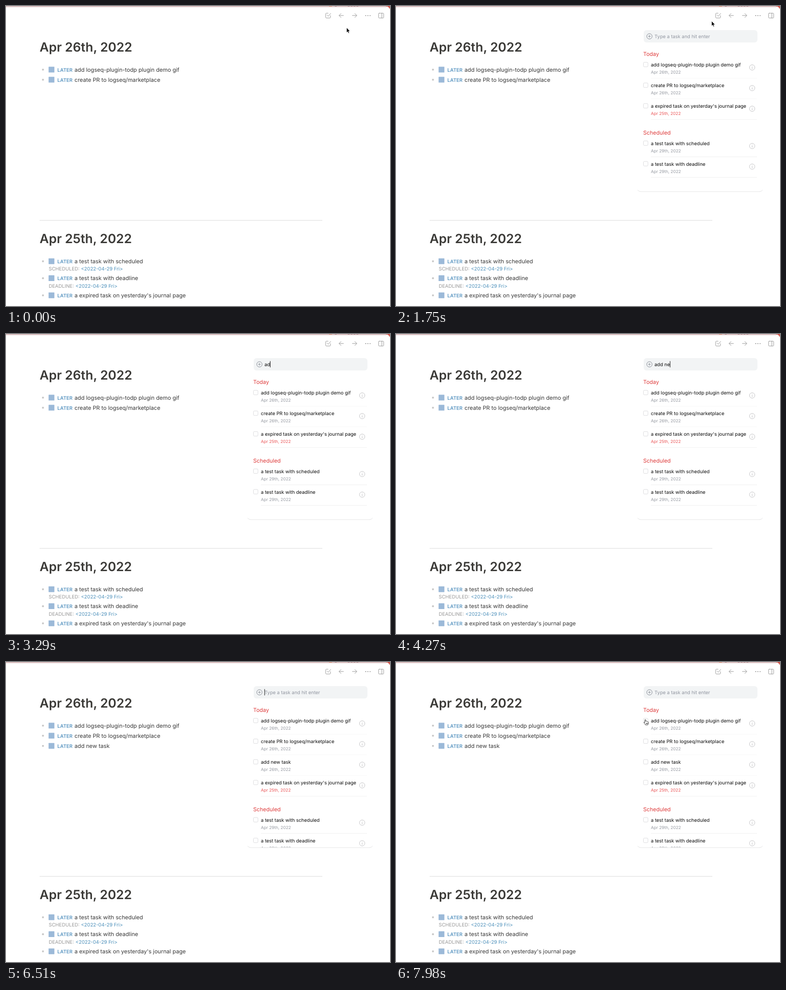
An HTML page for the animation above (8 s loop, 800 by 625 pixels).

```html
<!DOCTYPE html>
<html lang="en">
<head>
<meta charset="utf-8">
<title>Journal tasks</title>
<style>
  html, body { margin: 0; width: 100%; height: 100%; overflow: hidden; background: #fff; }
  svg { display: block; width: 800px; height: 625px; }
  text { font-family: Inter, sans-serif; white-space: pre; text-rendering: geometricPrecision; }
  .title { font-size: 26.4px; font-weight: 600; fill: #3b3a37; }
  .body { font-size: 11.6px; fill: #383838; }
  .later { font-size: 10.1px; font-weight: 600; fill: #5c97c2; }
  .meta { font-size: 10.1px; fill: #999; }
  .link { fill: #4b8fba; }
  .head { font-size: 11.4px; fill: #de3c3c; }
  .item { font-size: 9.95px; fill: #0c0c0c; }
  .date { font-size: 8.75px; fill: #9599a1; }
  .late { fill: #ea5658; }
  .hint { fill: #9196a0; }
  .icon { fill: none; stroke: #999; stroke-width: 1; stroke-linecap: round; stroke-linejoin: round; }
</style>
</head>
<body>
<svg id="stage" viewBox="0 0 800 625"></svg>
<script>
const LOOP = 8000, STEP = 70;
const PANEL_AT = 1470, ADDED_AT = 6370;

// time, x, y, shape; "none" hides the pointer
const pointer = [
  [0, 709.5, 45, "arrow"], [70, 709.5, 45, "arrow"], [210, 708, 44, "arrow"],
  [350, 708, 44, "arrow"], [490, 704, 41, "arrow"], [630, 700, 38, "arrow"],
  [840, 670, 23, "arrow"], [910, 668.8, 21.5, "arrow"], [1330, 669, 20, "arrow"],
  [1610, 669, 20, "arrow"], [1960, 640, 48, "arrow"], [2100, 626, 64, "beam"],
  [2310, 620.5, 71, "beam"], [3080, 620.5, 71, "none"], [6930, 620.5, 71, "beam"],
  [7140, 598, 78, "arrow"], [7490, 535, 116, "arrow"], [7630, 521, 124, "hand"],
  [7980, 521, 125, "hand"]
];

const typing = [
  [0, ""], [3080, "a"], [3290, "ad"], [3430, "add"], [4130, "add "], [4200, "add n"],
  [4270, "add ne"], [4340, "add new"], [4480, "add new "], [5180, "add new t"],
  [5250, "add new ta"], [5320, "add new tas"], [5390, "add new task"], [ADDED_AT, ""]
];

// time, caret on
const caretSteps = [
  [0, 0], [2450, 1], [3010, 0], [3080, 1], [3920, 0], [4130, 1], [4970, 0], [5180, 1],
  [5880, 0], [ADDED_AT, 1], [6930, 0], [7420, 1], [7910, 0]
];

const text = (x, y, cls, s) => `<text x="${x}" y="${y}" class="${cls}">${s}</text>`;
const icon = d => `<path class="icon" d="${d}"/>`;
const rule = (x1, x2, y, color) => `<path d="M${x1} ${y}H${x2}" stroke="${color}"/>`;

function block(y, label, id = "") {
  return `<g id="${id}"><circle cx="77" cy="${y - 4}" r="2.1" fill="#c9c9c9"/>
    <rect x="88.7" y="${y - 10.1}" width="12.1" height="12" rx=".6" fill="#9bb9d8"/>
    ${text(107, y, "later", "LATER")}${text(142.8, y, "body", label)}</g>`;
}

function meta(y, label, x) {
  return text(89, y, "meta", label) + text(x, y, "meta link", "&lt;2022-04-29 Fri&gt;");
}

function task(y, label, date, late = "", line = "#f8f8f8") {
  return `<rect x="515.5" y="${y - 8.7}" width="9.4" height="9.4" rx="2" fill="#fff" stroke="#dcdcde"/>
    ${text(531, y, "item", label)}${text(531, y + 15.3, "date " + late, date)}
    <circle cx="742" cy="${y + 2}" r="5.6" fill="none" stroke="#c6c6c8"/>
    <path d="M742 ${y + 1.3}v3.6M742 ${y - .9}v1" stroke="#b9b9bc"/>
    ${rule(531, 752, y + 24.5, line)}`;
}

const page = `
  <path d="M0 1.3H793" stroke="#b4787b"/>
  <path d="M792 .8Q797.500 1.500 799.500 6H800V0H792Z" fill="#cf5a50"/>
  <path d="M673 .3h6" stroke="#f0a070"/>
  <path d="M685 .2h5M712 .2h24" stroke="#a09498" stroke-dasharray="4 2"/>
  ${icon("M671 15H667.5Q666 15 666 16.500V23.500Q666 25 667.500 25H674.500Q676 25 676 23.500V20M669 19l2.300 2.300L676.500 15.500")}
  ${icon("M703.200 19.800H694M698 15.600L693.800 19.800L698 24")}
  ${icon("M721.500 19.800H730.700M726.700 15.600L730.900 19.800L726.700 24")}
  ${[749.5, 754, 758.5].map(x => `<circle cx="${x}" cy="20" r="1.1" fill="#999"/>`).join("")}
  ${icon("M777.500 15H785.500Q786.800 15 786.800 16.300V23.700Q786.800 25 785.500 25H777.500Q776.200 25 776.200 23.700V16.300Q776.200 15 777.500 15ZM783 15V25")}
  ${text(70, 95, "title", "Apr 26th, 2022")}
  ${block(136.6, "add logseq-plugin-todp plugin demo gif")}
  ${block(157.6, "create PR to logseq/marketplace")}
  ${block(178.8, "add new task", "newBlock")}
  ${rule(70, 659, 446.5, "#dcdcdc")}
  ${text(70, 494, "title", "Apr 25th, 2022")}
  ${block(535.8, "a test task with scheduled")}
  ${meta(551, "SCHEDULED:", 156.2)}
  ${block(571.2, "a test task with deadline")}
  ${meta(586.7, "DEADLINE:", 144.8)}
  ${block(606.8, "a expired task on yesterday's journal page")}`;

const panel = `
  <clipPath id="clip"><rect x="503" y="40" width="261" height="346.3"/></clipPath>
  <g id="panel">
    <path d="M503.500 383Q505 386.800 510 386.800H757Q762 386.800 763.500 383" fill="none" stroke="#e4e4e5"/>
    <rect x="516" y="50.300" width="237" height="25.600" rx="6" fill="#f2f4f5"/>
    <circle cx="528" cy="63.200" r="5.600" fill="none" stroke="#8b9099"/>
    <path d="M525.300 63.200h5.400M528 60.500v5.400" stroke="#8b9099"/>
    <text id="field" x="538.5" y="67"></text>
    <rect id="caret" y="56.500" width="1" height="13" fill="#111"/>
    <g clip-path="url(#clip)">
      ${text(515, 104, "head", "Today")}
      ${task(126, "add logseq-plugin-todp plugin demo gif", "Apr 26th, 2022")}
      ${task(169, "create PR to logseq/marketplace", "Apr 26th, 2022")}
      <g id="newTask">${task(212, "add new task", "Apr 26th, 2022")}</g>
      <g id="rest">
        ${task(212, "a expired task on yesterday's journal page", "Apr 25th, 2022", "late", "#f3f3f3")}
        ${text(515, 267.6, "head", "Scheduled")}
        ${task(289.7, "a test task with scheduled", "Apr 29th, 2022", "", "#eee")}
        ${task(332.6, "a test task with deadline", "Apr 29th, 2022", "", "#eee")}
      </g>
    </g>
  </g>`;

const pointers = `
  <path id="arrow" d="M0 0V10.600L2.400 8.400L4 12L5.800 11.200L4.200 7.700H7.400Z" fill="#000" stroke="#fff" stroke-width=".8"/>
  <path id="beam" d="M-2.500 -5.500Q0 -5.500 0 -4Q0 -5.500 2.500 -5.500M0 -4V4M-2.500 5.500Q0 5.500 0 4Q0 5.500 2.500 5.500M-1.300 1.500H1.300" fill="none" stroke="#222"/>
  <path id="hand" d="M-2.600 1V-4.500Q-1.500 -6 -.6 -4.500V-1.500Q.6 -2.500 1.300 -1.200Q2.500 -2 3.100 -.7Q4.700 -1 4.700 .7V3Q4.300 4.500 3.600 6H-1.300Q-2.500 3.500 -4.600 1.300Q-4.800 -.3 -2.600 1ZM.2 2V4M1.700 2V4M3 2V4" fill="#fff" stroke="#222" stroke-width=".9" stroke-linejoin="round"/>`;

const $ = id => document.getElementById(id);
$("stage").innerHTML = page + panel + pointers;

const show = (id, on) => $(id).setAttribute("visibility", on ? "inherit" : "hidden");
const lastIndex = (steps, t) => steps.findLastIndex(s => s[0] <= t);

function drawPointer(t) {
  const i = lastIndex(pointer, t);
  const [t0, x0, y0, shape] = pointer[i];
  const [t1, x1, y1] = pointer[i + 1] || [LOOP, x0, y0];
  const k = (t - t0) / (t1 - t0);
  for (const id of ["arrow", "beam", "hand"]) show(id, id === shape);
  if (shape !== "none")
    $(shape).setAttribute("transform", `translate(${x0 + (x1 - x0) * k} ${y0 + (y1 - y0) * k})`);
}

function drawField(t) {
  const typed = typing[lastIndex(typing, t)][1];
  const field = $("field");
  const content = typed || "Type a task and hit enter";
  if (field.textContent !== content) field.textContent = content;
  field.setAttribute("class", typed ? "item" : "item hint");
  $("caret").setAttribute("x", 538.3 + (typed ? field.getComputedTextLength() : 0));
  show("caret", caretSteps[lastIndex(caretSteps, t)][1]);
}

function frame(now) {
  const time = now % LOOP;
  const t = time - time % STEP;
  const added = t >= ADDED_AT;
  $("panel").setAttribute("display", t >= PANEL_AT ? "inline" : "none");
  show("newBlock", added);
  show("newTask", added);
  $("rest").setAttribute("transform", `translate(0 ${added ? 43 : 0})`);
  drawField(t);
  drawPointer(t);
  requestAnimationFrame(frame);
}
requestAnimationFrame(frame);
</script>
</body>
</html>
```
